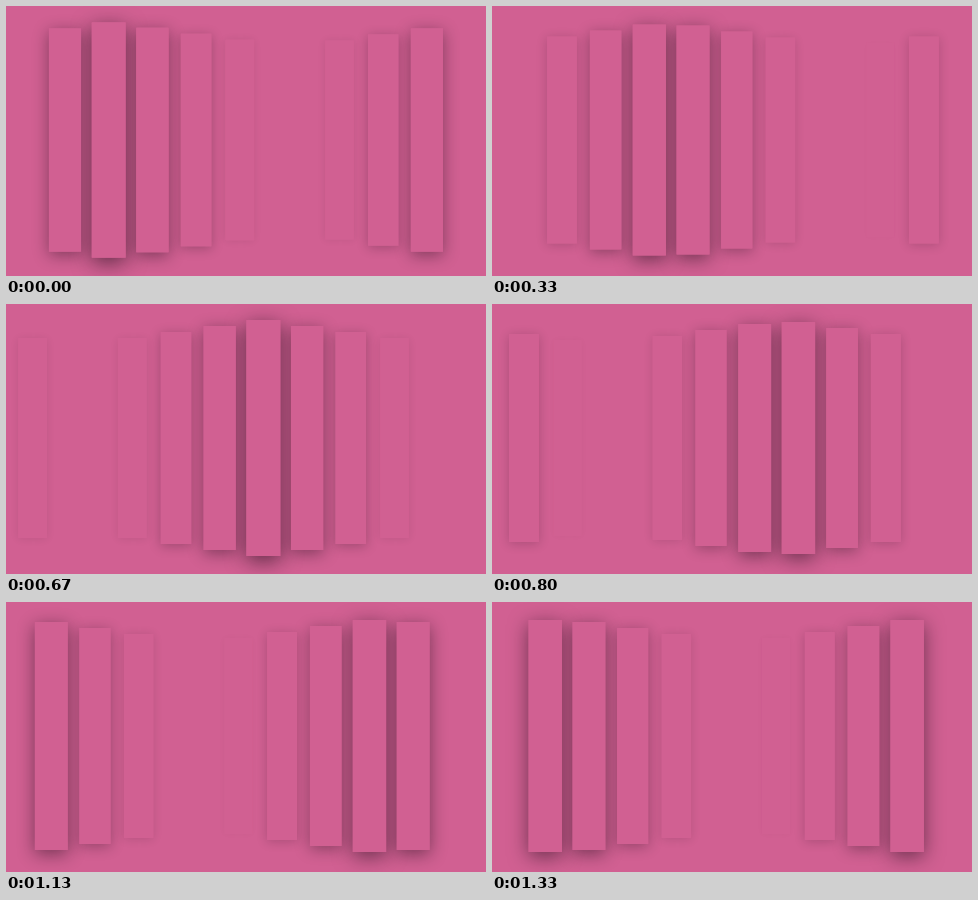
Write an HTML page with a canvas that moves like this. It is 480 px wide and 270 px high and loops after 1390 ms.

```html
<!DOCTYPE html>
<html lang="en">
<head>
<meta charset="utf-8">
<title>Rising bars</title>
<style>
  html, body { margin: 0; width: 100%; height: 100%; overflow: hidden; background: #d16092; }
  canvas { display: block; }
</style>
</head>
<body>
<canvas id="stage" width="480" height="270"></canvas>
<script>
const ctx = document.getElementById('stage').getContext('2d');
const PINK = '#d16092';
const LOOP = 1390;
const STEPS = 21;      // picture changes per loop, also the life of one bar
const LAG = 3;         // steps between neighbouring bars
const BARS = 8;
const CENTER_Y = 134;

// Each bar drifts right while it rises and sinks, then jumps back unseen.
function barAt(i, phase) {
  const life = (((phase - 1 - LAG * i) / STEPS + 0.5) % 1 + 1) % 1;
  const lift = 1 - Math.abs(2 * life - 1);
  const h = 194 + 42 * lift;
  const w = h * 0.144;
  const x = 102.3 + 51.7 * i + 56 * (life - 0.5);
  return { x: x - w / 2, y: CENTER_Y - h / 2, w, h, lift };
}

function draw(time) {
  const step = Math.floor((time % LOOP + 3.4) * 0.015);
  const phase = step + Math.max(0, 1.15 - 0.18 * step);
  const bars = Array.from({ length: BARS }, (_, k) => barAt(k - 1, phase));

  ctx.shadowColor = 'transparent';
  ctx.fillStyle = PINK;
  ctx.fillRect(0, 0, 480, 270);

  // All shadows fall on the ground, below every bar.
  for (const b of bars) {
    ctx.shadowColor = `rgba(20, 10, 20, ${0.6 * b.lift})`;
    ctx.shadowBlur = 6 + 14 * b.lift;
    ctx.shadowOffsetY = 5 * b.lift;
    ctx.fillRect(b.x, b.y, b.w, b.h);
  }
  ctx.shadowColor = 'transparent';
  for (const b of bars) ctx.fillRect(b.x, b.y, b.w, b.h);
}

const start = performance.now();
function tick() {
  draw(performance.now() - start);
  requestAnimationFrame(tick);
}
tick();
</script>
</body>
</html>
```
